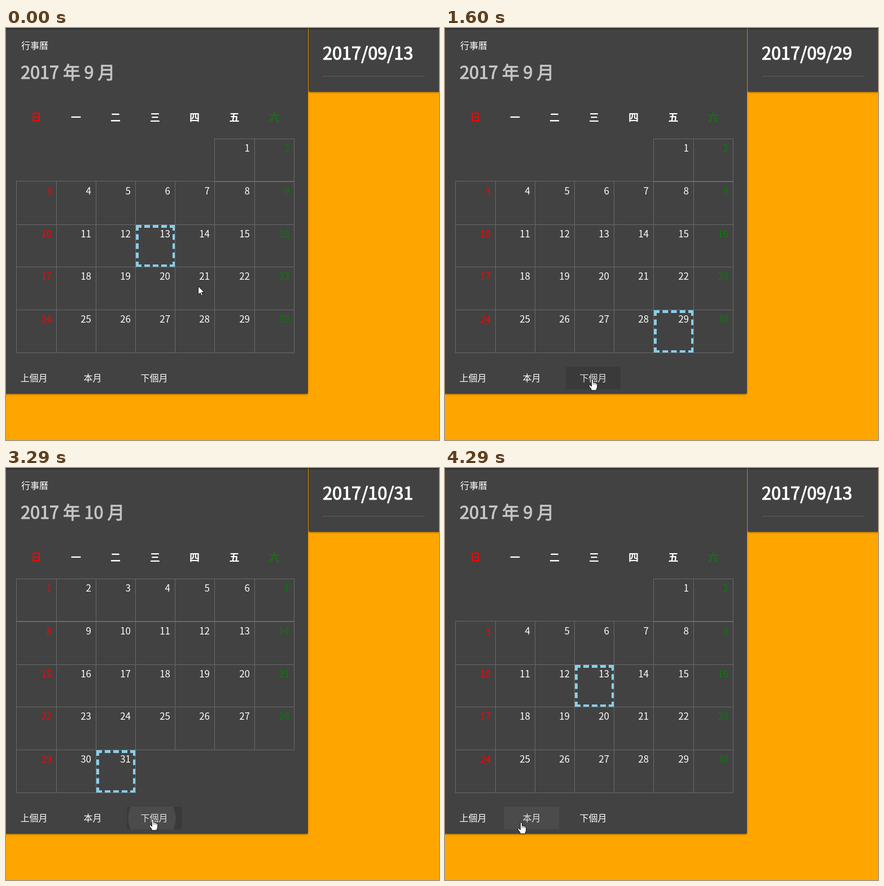
Write an HTML page with a canvas that moves like this. It is 767x730 px and loops after 4440 ms.

```html
<!DOCTYPE html>
<html lang="zh-Hant">
<head>
<meta charset="utf-8">
<title>行事曆</title>
<style>
html, body { margin: 0; width: 100%; height: 100%; overflow: hidden; background: #ffa500; }
#stage { position: relative; width: 767px; height: 730px; overflow: hidden; background: #ffa500; }
#stage > * { position: absolute; box-sizing: border-box; }
.card {
  background: #424242; border-radius: 2px;
  box-shadow: 0 3px 1px -2px rgba(0,0,0,.2), 0 2px 2px 0 rgba(0,0,0,.14), 0 1px 5px 0 rgba(0,0,0,.12);
}
#month { left: -4px; top: -4px; width: 539px; height: 652px; }
#day { left: 536px; top: -4px; width: 240px; height: 117px; }
#bar { left: -5px; top: -20px; width: 777px; height: 20px; }
#pick { border: 5px dashed skyblue; }
canvas { left: 0; top: 0; }
</style>
</head>
<body>
<div id="stage">
  <div id="month" class="card"></div>
  <div id="day" class="card"></div>
  <div id="bar" class="card"></div>
  <div id="pick"></div>
  <canvas id="view" width="767" height="730"></canvas>
</div>
<script>
const ctx = document.getElementById('view').getContext('2d');
const pick = document.getElementById('pick');
const LOOP = 4440, TICK = 76.9, LEAD = 25, YEAR = 2017;
const FAMILY = '"Noto Sans CJK TC", "Noto Sans CJK", "Noto Sans", sans-serif';
const rows = [196, 272, 348, 423, 499, 575];
const colX = c => Math.floor(18.9 + 70.2 * c);
const dayColor = c => c === 0 ? '#f00' : c === 6 ? '#008000' : '#fff';

const buttons = [
  { label: '上個月', x: 1, mid: 49.5 },
  { label: '本月', x: 105, mid: 153.5 },
  { label: '下個月', x: 214, mid: 262.5 }
];
const BTN = { y: 600, w: 97, h: 40 };

// tick, month, selected day
const states = [[0, 9, 13], [5, 9, 21], [12, 9, 29], [23, 10, 29], [34, 10, 31], [44, 11, 30], [53, 9, 13]];

// tick, pointer x, pointer y
const route = [
  [0, 340, 457], [1, 339, 457], [5, 339, 457], [6, 352, 478], [7, 384, 528], [8, 398, 544],
  [12, 398, 544], [13, 325, 565], [14, 255, 580], [15, 248, 597], [16, 254, 613], [17, 266, 624],
  [18, 269, 627], [19, 269, 626], [20, 269, 626], [21, 261, 622], [25, 261, 622], [26, 215, 597],
  [27, 190, 587], [28, 172, 575], [30, 180, 549], [32, 205, 535], [34, 205, 535], [36, 220, 578],
  [38, 257, 619], [39, 260, 622], [44, 260, 622], [45, 222, 628], [46, 165, 633], [47, 139, 633],
  [50, 135, 628], [60, 135, 628]
];

const ripples = [
  { btn: 2, x: 261, y: 622, start: 20.8, end: 26 },
  { btn: 2, x: 258.5, y: 621, start: 40.7, end: 46 },
  { btn: 1, x: 135, y: 628, start: 50.58, end: 60 }
];

function text(str, x, y, size, weight, color, align = 'left', bold = 0) {
  ctx.font = `${weight} ${size}px ${FAMILY}`;
  ctx.textAlign = align;
  ctx.fillStyle = ctx.strokeStyle = color;
  ctx.fillText(str, x, y);
  if (bold) {
    ctx.lineWidth = bold;
    ctx.lineJoin = 'round';
    ctx.strokeText(str, x, y);
  }
}

function box(x, y, w, h, color) {
  ctx.fillStyle = color;
  ctx.fillRect(x, y, w, h);
}

// cubic-bezier(0, 0, .2, 1)
function easeOut(p) {
  if (p <= 0) return 0;
  if (p >= 1) return 1;
  let lo = 0, hi = 1;
  for (let i = 0; i < 20; i++) {
    const u = (lo + hi) / 2;
    if (.6 * u * u + .4 * u * u * u < p) lo = u; else hi = u;
  }
  return 3 * lo * lo - 2 * lo * lo * lo;
}

function pointerAt(tick) {
  let i = 1;
  while (i < route.length - 1 && route[i][0] < tick) i++;
  const [t0, x0, y0] = route[i - 1], [t1, x1, y1] = route[i];
  const p = (tick - t0) / (t1 - t0);
  return { x: Math.round(x0 + (x1 - x0) * p), y: Math.round(y0 + (y1 - y0) * p) };
}

const inside = (b, p) => p.x >= b.x && p.x < b.x + BTN.w && p.y >= BTN.y && p.y < BTN.y + BTN.h;

function drawCalendar(month, day) {
  text('行事曆', 27, 37, 16, 300, '#fff');
  text(`${YEAR} 年 ${month} 月`, 26, 90, 30.7, 400, '#c6c6c6', 'left', 1);
  [...'日一二三四五六'].forEach((name, c) =>
    text(name, (colX(c) + colX(c + 1)) / 2, 165, 18, 700, dayColor(c), 'center'));

  const first = new Date(YEAR, month - 1, 1).getDay();
  const count = new Date(YEAR, month, 0).getDate();
  for (let d = 1; d <= count; d++) {
    const slot = first + d - 1, c = slot % 7, r = Math.floor(slot / 7);
    const x = colX(c), right = colX(c + 1), bottom = rows[r + 1];
    const top = r === 1 ? rows[r] - 1 : rows[r];
    const line = '#696969';
    box(x, top, right - x + 1, 1, line);
    box(x, bottom, right - x + 1, 1, line);
    box(x, top, 1, bottom - top + 1, line);
    box(right, top, 1, bottom - top + 1, line);
    text(d, right - 8, rows[r] + 23, 17, 300, dayColor(c), 'right');
    if (d === day) {
      pick.style.left = x + 1 + 'px';
      pick.style.top = rows[r] + 1 + 'px';
      pick.style.width = right - x + 'px';
      pick.style.height = bottom - rows[r] + 'px';
      // keep the dashed frame clear of grid lines
      ctx.clearRect(x + 1, rows[r] + 1, 0, 0);
    }
  }
}

function drawDate(month, day) {
  const two = n => String(n).padStart(2, '0');
  text(`${YEAR}/${two(month)}/${two(day)}`, 561, 56, 30.7, 400, '#fff', 'left', 1.1);
  box(561, 85, 181, 1, '#5d5d5d');
}

function drawButtons(tick, p) {
  buttons.forEach((b, i) => {
    text(b.label, b.mid, 626, 16, 300, '#fff', 'center');
    if (inside(b, p)) box(b.x, BTN.y, BTN.w, BTN.h, 'rgba(0,0,0,.12)');
    for (const r of ripples) {
      if (r.btn !== i || tick < r.start || tick >= r.end) continue;
      const dx = Math.max(r.x - b.x, b.x + BTN.w - r.x);
      const dy = Math.max(r.y - BTN.y, BTN.y + BTN.h - r.y);
      const size = Math.hypot(dx, dy) * easeOut((tick - r.start) * TICK / 450);
      ctx.save();
      ctx.beginPath();
      ctx.rect(b.x, BTN.y, BTN.w, BTN.h);
      ctx.clip();
      ctx.beginPath();
      ctx.arc(r.x, r.y, size, 0, Math.PI * 2);
      ctx.fillStyle = 'rgba(255,255,255,.085)';
      ctx.fill();
      ctx.restore();
    }
  });
}

const arrow = new Path2D('M.5 .5V15.5L4 12.2L6.3 17.3L8.6 16.3L6.4 11.2H11Z');
const hand = new Path2D('M-1.5 1Q0 -1 1.5 1V6Q3 5 4 6.7Q5.5 5.8 6.5 7.5Q8.5 7 8.8 9.5V14Q8.5 16 7.3 17.5V20H-2V17.8L-5.8 12.5Q-6.5 10.5 -4.5 10.5L-1.5 13Z');
const fingers = new Path2D('M1.5 6V10M4 7V10M6.5 8V10.5');

function drawPointer(p) {
  const overButton = buttons.some(b => inside(b, p));
  const shape = overButton ? hand : arrow;
  ctx.save();
  ctx.translate(p.x, p.y);
  ctx.fillStyle = '#fff';
  ctx.strokeStyle = '#111';
  ctx.lineWidth = 1;
  ctx.lineJoin = 'miter';
  ctx.fill(shape);
  ctx.stroke(shape);
  if (overButton) {
    ctx.lineWidth = .6;
    ctx.stroke(fingers);
  }
  ctx.restore();
}

function draw(ms) {
  const tick = Math.floor((ms + LEAD) / TICK);
  const [, month, day] = states.filter(s => s[0] <= tick).pop();
  const p = pointerAt(tick);
  ctx.clearRect(0, 0, 767, 730);
  drawCalendar(month, day);
  drawDate(month, day);
  drawButtons(tick, p);
  drawPointer(p);
}

const began = performance.now();
function loop() {
  draw((performance.now() - began) % LOOP);
  requestAnimationFrame(loop);
}
loop();
</script>
</body>
</html>
```
